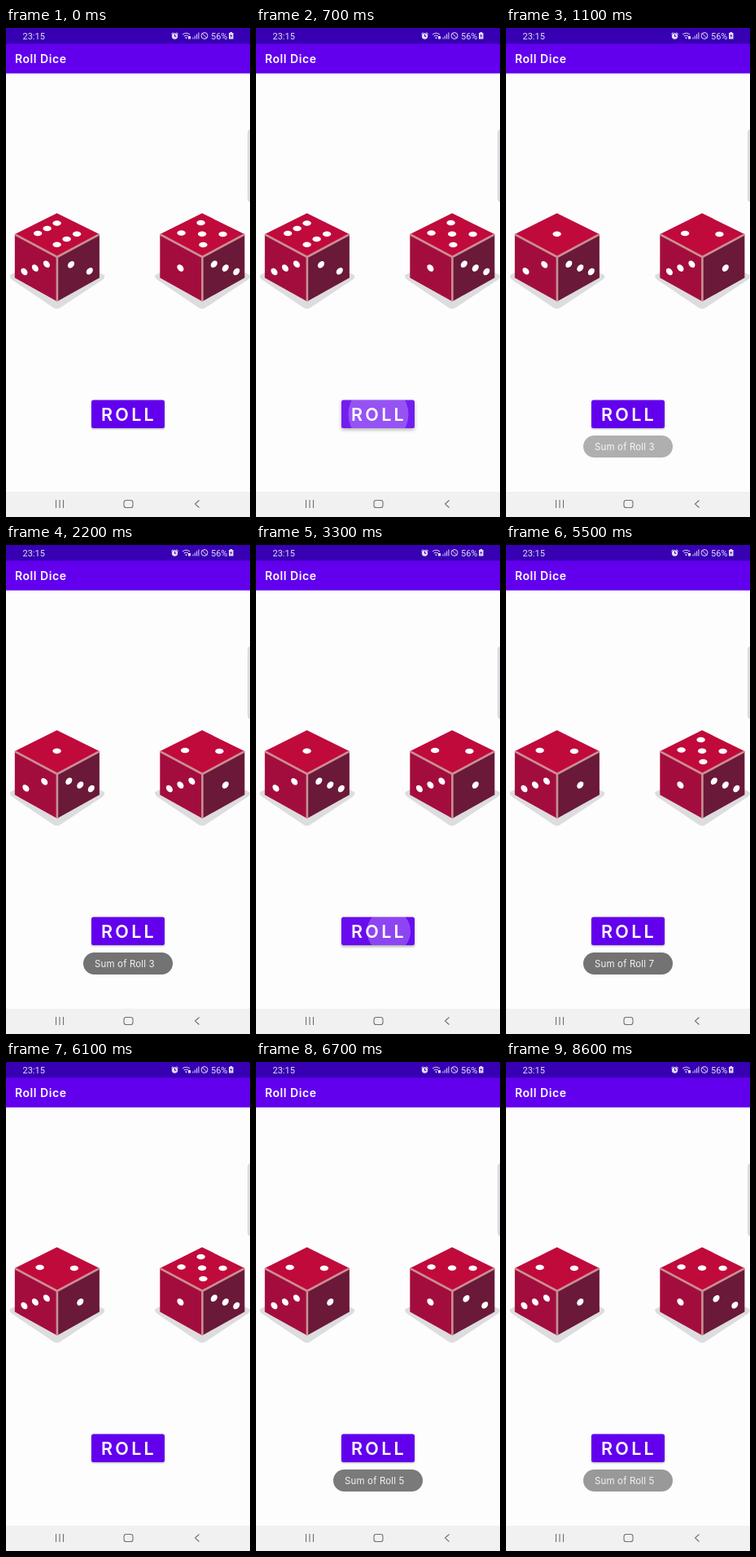
Recreate the animation shown at these times as an HTML page. Size 300 by 600 pixels, loop 8700 ms.

```html
<!DOCTYPE html>
<html lang="en">
<head>
<meta charset="utf-8">
<title>Roll Dice</title>
<style>
  html, body { margin: 0; width: 100%; height: 100%; overflow: hidden; background: #fdfdfd; }
  svg { display: block; width: 100%; height: 100%; }
  text { font-family: Inter, sans-serif; fill: #fff; white-space: pre; }
  .status text { font-family: Roboto, sans-serif; font-size: 11px; fill: #e4dcf7; }
  .line { fill: none; stroke: #e4dcf7; stroke-width: 1; }
  .nav { fill: none; stroke: #707070; stroke-width: 1.1; }
</style>
</head>
<body>
<svg viewBox="0 0 300 600">
  <defs>
    <clipPath id="buttonClip"><rect x="105" y="456.500" width="90" height="34.500" rx="2.500"/></clipPath>
    <g id="cube">
      <path d="M-57.500 303Q-59 306 -55 309L-4.500 343Q0 346 4.500 343L56 309Q60 306 58 303L0 275Z" fill="#dddcde"/>
      <path d="M0 227.300L52.300 253L0.300 281L-51.800 253Z" fill="#c00a3c"/>
      <path d="M-51.800 253L0.300 281V335.500L-51.800 306.500Z" fill="#a30d3d"/>
      <path d="M52.300 253L0.300 281V335.500L52.300 306.500Z" fill="#6a1938"/>
      <path d="M-51.500 253.300L0.300 281L52 253.300M0.300 281V335" fill="none" stroke="#cb8f94" stroke-width="2.600"/>
    </g>
  </defs>

  <rect width="300" height="600" fill="#fdfdfd"/>
  <rect width="300" height="55.700" fill="#6200ee"/>
  <rect width="300" height="19.300" fill="#3700b3"/>
  <g class="status">
    <text x="20.500" y="13.500">23:15</text>
    <text x="252" y="13.500">56%</text>
    <circle cx="207.500" cy="10" r="3.700" fill="#e4dcf7"/>
    <path class="line" d="M203.300 7.500L205.500 5.500M209.500 5.500L211.700 7.500"/>
    <path d="M207.500 7.700V10.300H209.300" fill="none" stroke="#3700b3"/>
    <path class="line" d="M217 8Q221.500 4.500 226 8M218.800 10Q221.500 8 224.200 10"/>
    <path d="M220 11.500H223L221.500 13.500ZM224 10H227V13.500H224Z" fill="#e4dcf7"/>
    <path class="line" d="M230 11.500V13.500M232.300 9.500V13.500M234.600 7.500V13.500M236.900 5.500V13.500"/>
    <circle class="line" cx="244" cy="9.500" r="3.900"/>
    <path class="line" d="M241.300 6.800L246.700 12.200"/>
    <path d="M274 6H275.500V5H278V6H279.500V13.500H274Z" fill="#e4dcf7"/>
    <path d="M277.300 7L275.300 10H276.700L276 12.500L278.300 9.300H276.900Z" fill="#3700b3"/>
  </g>
  <text x="11" y="43" font-size="14" font-weight="600" letter-spacing=".55">Roll Dice</text>

  <path d="M300 125Q297.500 125 297.500 129V209Q297.500 213 300 213Z" fill="#dfe3e8" stroke="#c3c8cf" stroke-width=".6"/>

  <g transform="translate(62.600 0)"><use href="#cube"/><g id="leftPips" fill="#fff"/></g>
  <g transform="translate(241.100 0)"><use href="#cube"/><g id="rightPips" fill="#fff"/></g>

  <rect id="button" x="105" y="456.500" width="90" height="34.500" rx="2.500" fill="#6200ee"/>
  <g fill="#fff" clip-path="url(#buttonClip)">
    <rect id="highlight" x="105" y="456" width="90" height="36"/>
    <circle id="ripple" cy="474"/>
  </g>
  <text x="117" y="482.300" font-size="21.500" font-weight="600" letter-spacing="3.300">ROLL</text>

  <g id="toast">
    <rect x="95" y="500" width="110" height="27" rx="13.500" fill="#737373"/>
    <text id="message" x="109" y="517.700" font-size="11.500" letter-spacing=".15" style="fill:#f2f2f2"></text>
  </g>

  <rect y="569" width="300" height="31" fill="#f1f1f1"/>
  <path class="nav" d="M61.500 579V589M66 579V589M70.500 579V589M237.500 579.500L232.500 584L237.500 588.500"/>
  <rect class="nav" x="145" y="579.500" width="11" height="9" rx="2.800"/>
</svg>
<script>
const LOOP = 8700;
const $ = id => document.getElementById(id);
const clamp = v => Math.max(0, Math.min(1, v));

// Pip centres relative to the vertical axis of a die.
const middle = [0, 252.7], west = [-25.5, 251.5], east = [25.5, 253];
const topPips = {
  1: [middle],
  2: [[-21, 252], [21.3, 253]],
  3: [west, middle, east],
  5: [west, middle, east, [-1.5, 239], [1.3, 266]],
  6: [[0, 239.5], [-12, 246], [-23.5, 252], [24.5, 252.7], [12, 259], [0, 265.7]]
};
const sidePips = {
  1: [[28, 294.5]],
  2: [[16.7, 290.3], [39.5, 298.3]],
  3: [[14, 289.7], [28, 294.5], [41.5, 299]]
};
// Values on the left and right side for each top value.
const sides = { 1: [2, 3], 2: [3, 1], 3: [1, 2], 5: [1, 3], 6: [3, 2] };

const rolls = [
  { press: 545, touch: 152, release: 800, land: 850, toast: 1000, dice: [1, 2] },
  { press: 3200, touch: 180, release: 3550, land: 3650, toast: 3850, dice: [2, 5] },
  { press: 6200, touch: 165, release: 6420, land: 6450, toast: 6530, dice: [2, 3] }
];

const pip = (x, y, rx, ry, angle) =>
  `<ellipse rx="${rx}" ry="${ry}" transform="translate(${x} ${y}) rotate(${angle})"/>`;

function pips(value) {
  const [left, right] = sides[value];
  return topPips[value].map(([x, y]) => pip(x, y, 5.2, 3.2, 0)).join('') +
    sidePips[left].map(([x, y]) => pip(1.3 - x, y, 3.4, 4.8, -40)).join('') +
    sidePips[right].map(([x, y]) => pip(x + 0.7, y, 3.4, 4.8, 40)).join('');
}

let shown = '';
function showDice(dice) {
  if (shown === String(dice)) return;
  shown = String(dice);
  $('leftPips').innerHTML = pips(dice[0]);
  $('rightPips').innerHTML = pips(dice[1]);
}

function drawRipple(t) {
  const roll = rolls.filter(r => t >= r.press).pop() || rolls[0];
  const grow = 1 - (1 - clamp((t - roll.press) / 300)) ** 2;
  const fade = 1 - clamp((t - roll.release) / 200);
  const lift = grow * fade;
  $('ripple').setAttribute('cx', roll.touch + (150 - roll.touch) * grow);
  $('ripple').setAttribute('r', 48 * grow);
  $('ripple').setAttribute('opacity', 0.24 * fade);
  $('highlight').setAttribute('opacity', 0.25 * grow ** 3 * fade);
  $('button').style.filter =
    `drop-shadow(0 ${1 + 2.5 * lift}px ${1 + 1.5 * lift}px rgba(0,0,0,.3))`;
}

function drawToast(t) {
  const roll = rolls.filter(r => t >= r.toast).pop();
  const age = roll ? t - roll.toast : Infinity;
  $('toast').setAttribute('opacity', clamp(age / 180) * (1 - clamp((age - 2000) / 250)));
  if (roll) $('message').textContent = 'Sum of Roll ' + (roll.dice[0] + roll.dice[1]);
}

const start = performance.now();
function frame() {
  const t = (performance.now() - start) % LOOP;
  const landed = rolls.filter(r => t >= r.land).pop();
  showDice(landed ? landed.dice : [6, 5]);
  drawRipple(t);
  drawToast(t);
  requestAnimationFrame(frame);
}
frame();
</script>
</body>
</html>
```
